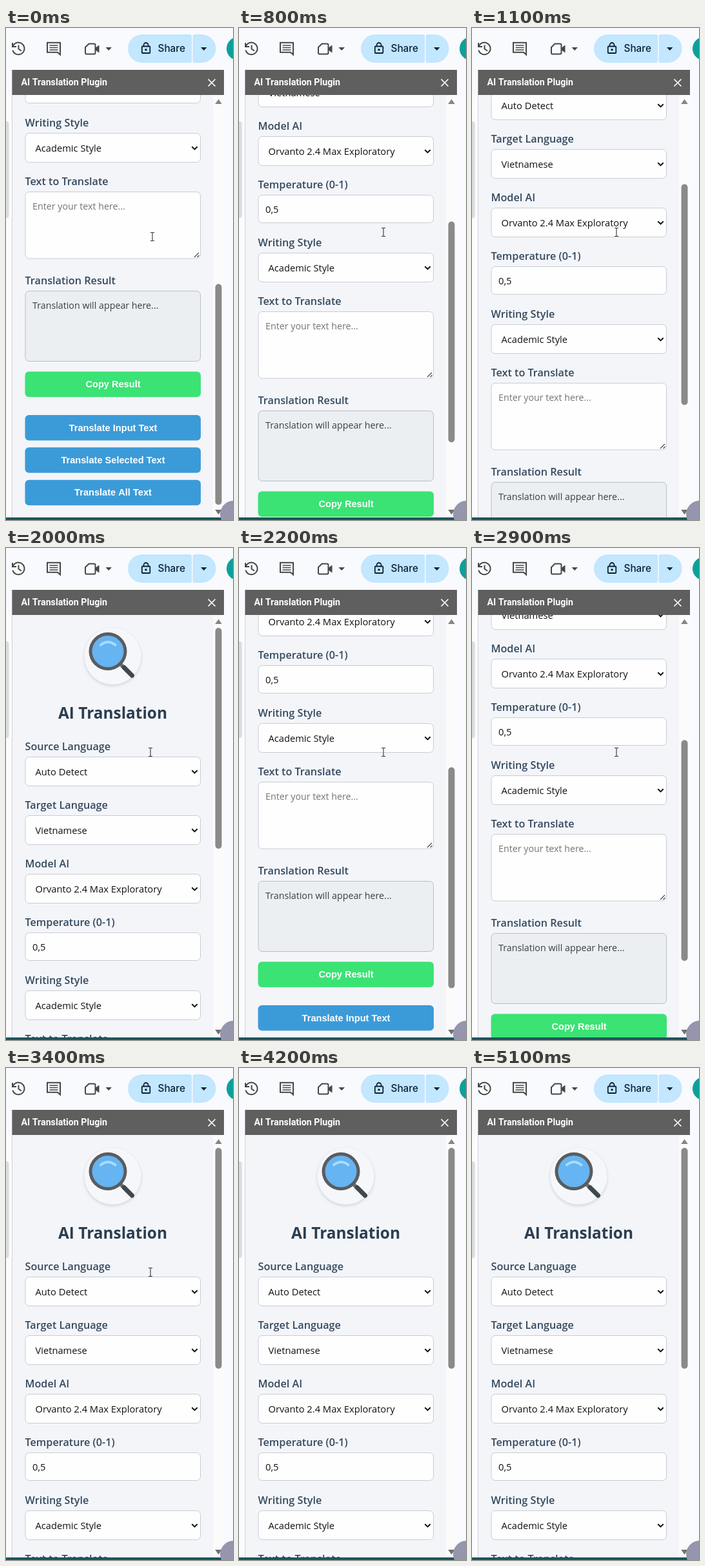
An HTML page with a canvas for the animation above (5200 ms loop, 352 px wide and 764 px high).

```html
<!DOCTYPE html>
<html lang="en">
<head>
<meta charset="utf-8">
<title>AI Translation panel</title>
<style>
  html, body { margin: 0; width: 100%; height: 100%; overflow: hidden; background: #f9fafd; }
  canvas { display: block; }
</style>
</head>
<body>
<canvas id="stage" width="352" height="764"></canvas>
<script>
const ctx = document.getElementById("stage").getContext("2d");
const LOOP = 5200, STEP = 100, MAX_SCROLL = 524, CURSOR_LEAVES = 4000;
const SANS = '"Open Sans", "Noto Sans", sans-serif';
const ARIAL = '"Liberation Sans", Arial, sans-serif';
const INK = "#444746", LABEL = "#34495e", BORDER = "#c8cdd3";

// [time, value] pairs: a slow scroll up, then a quick one down and up again
const scrollKeys = [[0, 524], [400, 524], [1000, 245], [1100, 227], [1500, 0],
  [2000, 0], [2100, 190], [2200, 415], [2300, 500], [2400, 524],
  [2800, 524], [2900, 334], [3000, 109], [3100, 24], [3200, 0], [LOOP, 0]];
const cursorKeys = [[0, 0], [200, 1], [LOOP, 1]];

function valueAt(keys, t) {
  const i = keys.findIndex(k => k[0] > t);
  const [t0, a] = keys[i - 1], [t1, b] = keys[i];
  return a + (b - a) * (t - t0) / (t1 - t0);
}

function rect(x, y, w, h, color) {
  ctx.fillStyle = color;
  ctx.fillRect(x, y, w, h);
}

function box(x, y, w, h, r, fill, border) {
  ctx.beginPath();
  ctx.roundRect(x, y, w, h, r);
  ctx.fillStyle = fill;
  ctx.fill();
  if (border) {
    ctx.strokeStyle = border;
    ctx.lineWidth = 1;
    ctx.stroke();
  }
}

function disc(x, y, r, color) {
  ctx.beginPath();
  ctx.arc(x, y, r, 0, Math.PI * 2);
  ctx.fillStyle = color;
  ctx.fill();
}

function path(d, color, width) {
  const p = new Path2D(d);
  if (width) {
    ctx.strokeStyle = color;
    ctx.lineWidth = width;
    ctx.stroke(p);
  } else {
    ctx.fillStyle = color;
    ctx.fill(p);
  }
}

function text(str, x, y, font, color, align = "left") {
  ctx.font = font;
  ctx.fillStyle = color;
  ctx.textAlign = align;
  ctx.fillText(str, x, y);
}

function label(str, y) {
  text(str, 29.5, y + 6, `600 16.2px ${SANS}`, LABEL);
}

function field(y, h, fill = "#fefefe", border = BORDER) {
  box(30, y, 271.5, h, 6, fill, border);
}

function select(str, y) {
  field(y, 45);
  text(str, 45.5, y + 28.5, `14.7px ${SANS}`, "#111");
  path(`M288.3 ${y + 20.7}l4.2 4.2l4.2-4.2`, "#111", 2);
}

function button(str, y, color) {
  box(29.5, y, 272.5, 39.5, 6, color);
  text(str, 166, y + 24.5, `bold 14.6px ${ARIAL}`, "#fff", "center");
}

function drawMagnifier() {
  ctx.save();
  ctx.shadowColor = "rgba(0,0,0,.14)";
  ctx.shadowBlur = 5;
  ctx.shadowOffsetY = 2;
  disc(165.5, 168, 44, "#f6f7fa");
  ctx.restore();
  path("M176 179l7 7", "#6d7376", 6);
  ctx.lineCap = "round";
  path("M183 185.5l12.5 12.5", "#3f484c", 7);
  ctx.lineCap = "butt";
  disc(158, 160.5, 29.5, "#5a5c5e");
  disc(158, 160.5, 24.5, "#66b4f1");
  ctx.lineCap = "round";
  path("M147 150.5Q158 141.5 169.5 150.5", "#a8dcff", 4);
  ctx.lineCap = "butt";
}

function drawForm(scroll) {
  ctx.save();
  ctx.beginPath();
  ctx.rect(10, 104, 311, 656);
  ctx.clip();
  ctx.translate(0, -Math.round(scroll));

  drawMagnifier();
  text("AI Translation", 165.5, 265, `bold 24.4px ${SANS}`, "#2c3e50", "center");

  label("Source Language", 308);
  select("Auto Detect", 324.5);
  label("Target Language", 399);
  select("Vietnamese", 415.5);
  label("Model AI", 490);
  select("Orvanto 2.4 Max Exploratory", 506.5);
  label("Temperature (0-1)", 581);
  field(597.5, 43);
  text("0,5", 41, 625, `14.7px ${SANS}`, "#111");
  label("Writing Style", 670.5);
  select("Academic Style", 687.5);

  label("Text to Translate", 761.5);
  field(778.5, 103.5);
  text("Enter your text here...", 41, 806, `14.25px ${SANS}`, "#757575");
  path("M292 880l7-7M296.5 880l3-3", "#444", 1.1);

  label("Translation Result", 916);
  field(932.5, 109, "#ebeff2", "#b8bfc5");
  text("Translation will appear here...", 41, 960, `14.25px ${SANS}`, "#3a3f45");

  button("Copy Result", 1057.5, "#3ae374");
  button("Translate Input Text", 1125, "#3b9bd9");
  button("Translate Selected Text", 1175.2, "#3b9bd9");
  button("Translate All Text", 1225.7, "#3b9bd9");
  ctx.restore();
}

function drawToolbar() {
  // History
  path("M10.8 28A9.3 9.3 0 1 1 10.3 34.5M10 23v6h6M19.5 26.5v6l4.5 3", INK, 2);
  // Comment
  path("M64 22.8H84V41.5L80 37.8H64Z", INK, 2);
  path("M67.5 27h13M67.5 30.5h13M67.5 34h13", INK, 1.7);
  // Camera
  path("M128.5 24.5H136.5Q138.5 24.5 138.5 26.5V38.5Q138.5 40.5 136.5 40.5H125Q123 40.5 123 38.5V30Z", INK, 2);
  path("M139 30.5l5.5-4v12l-5.5-4Z", INK);
  path("M154.5 30h9.5l-4.75 5Z", INK);
  // Share
  box(189, 10, 99, 44, [22, 3, 3, 22], "#c2e7ff");
  box(289.5, 10, 36, 44, [3, 22, 22, 3], "#c2e7ff");
  ctx.beginPath();
  ctx.roundRect(210.8, 28.5, 12.5, 10.5, 1);
  ctx.strokeStyle = "#0b2136";
  ctx.lineWidth = 1.8;
  ctx.stroke();
  path("M213.5 28.5v-2a3.5 3.5 0 0 1 7 0v2", "#0b2136", 1.8);
  disc(217, 33.7, 1.7, "#0b2136");
  text("Share", 235.5, 37, '500 15.3px Inter, sans-serif', "#0b2136");
  path("M302 30h9.5l-4.75 5Z", "#0b2136");
  disc(360, 32, 18, "#0d9f9a");
}

function drawPanel(scroll) {
  rect(0, 104, 9, 656, "#fbfbfd");
  box(-5, 145, 9.5, 150, 4, "#dadce0");
  rect(9, 65, 1, 695, "#d0d3d7");
  rect(10, 104, 311, 656, "#f3f5f9");
  rect(321, 104, 17, 656, "#fbfbfc");
  drawForm(scroll);
  rect(9.5, 65, 328.5, 39, "#5f5f5f");
  text("AI Translation Plugin", 23.5, 88.5, "bold 14.2px Roboto, sans-serif", "#fff");
  path("M313.5 79.5l11 11M324.5 79.5l-11 11", "#fff", 1.7);

  path("M324.2 118l5.3-7.5 5.3 7.5Z", "#858585");
  path("M324.2 748l5.3 7.5 5.3-7.5Z", "#707070");
  box(324.5, 124 + scroll * 273.5 / MAX_SCROLL, 10, 343, 5, "#8a8a8a");
}

function drawCursor(k) {
  const x = Math.round(227 - 3.5 * k), y = Math.round(324 - 7 * k);
  path(`M${x - 3} ${y - 6.5}h2.2l.8.8l.8-.8h2.2M${x} ${y - 6}v12M${x - 3} ${y + 6.5}h2.2l.8-.8l.8.8h2.2`, "#333", 1.1);
}

function draw(now) {
  const t = Math.floor(now % LOOP / STEP) * STEP;
  rect(0, 0, 352, 764, "#f9fafd");
  drawToolbar();
  drawPanel(valueAt(scrollKeys, t));
  rect(0, 760, 352, 4, "#1c555c");
  disc(353, 755, 21, "#9695ae");
  if (t < CURSOR_LEAVES) drawCursor(valueAt(cursorKeys, t));
  requestAnimationFrame(draw);
}
requestAnimationFrame(draw);
</script>
</body>
</html>
```
